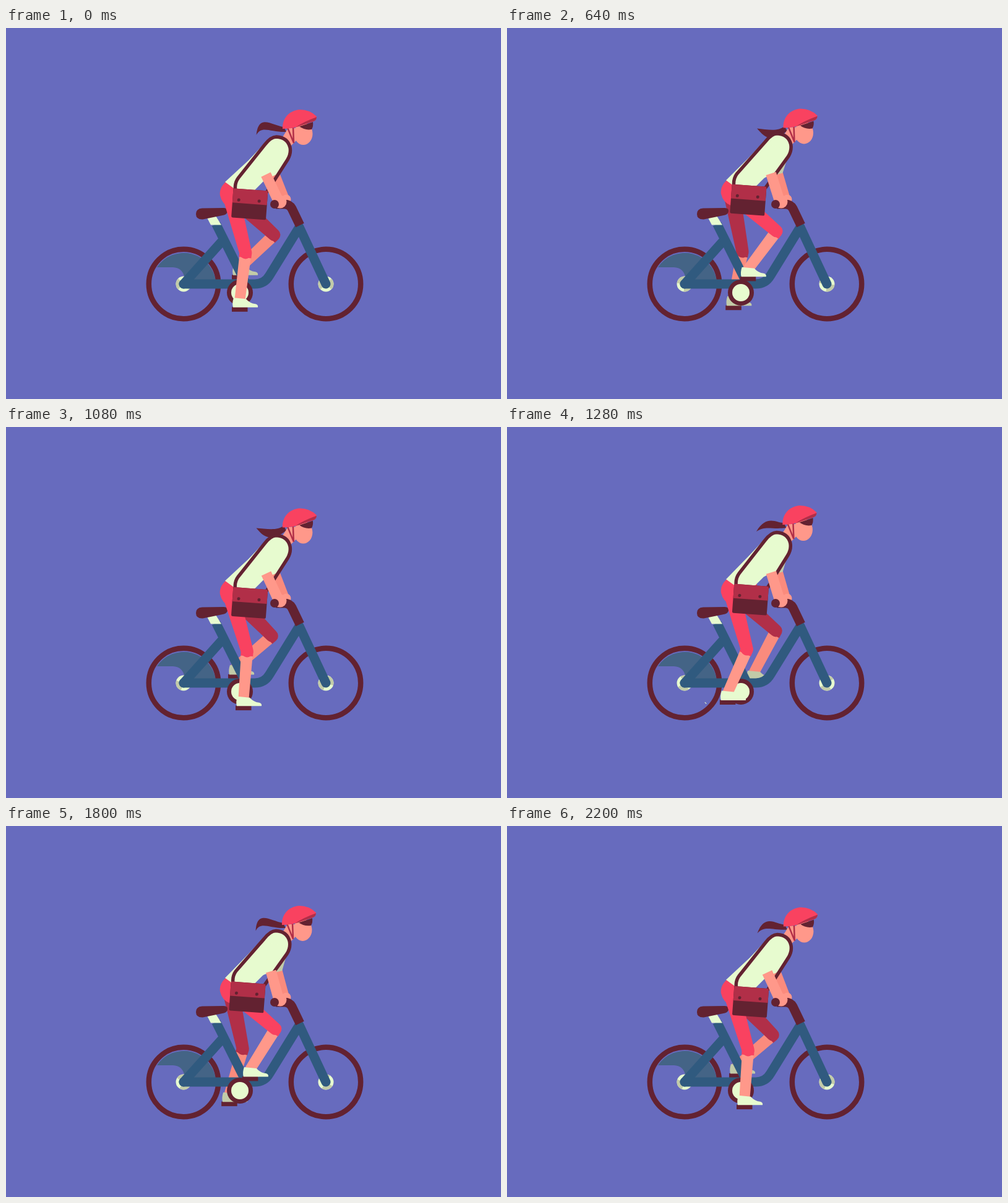
An HTML page for the animation above (2240 ms loop, 800 by 600 pixels).

```html
<!DOCTYPE html>
<html lang="en">
<head>
<meta charset="utf-8">
<title>Cyclist</title>
<style>
  html, body { margin: 0; width: 100%; height: 100%; overflow: hidden; background: #676bbe; }
  svg { display: block; width: 100vw; height: 100vh; }
  .dark { fill: #632231; }
  .light { fill: #e7fbcf; }
  .skin { fill: #ff988a; }
  .skin2 { fill: #fa8b7d; }
  .red { fill: #f94260; }
  .red2 { fill: #b12f48; }
  .shade { fill: #c2cba8; }
  .line { fill: none; stroke-width: 15; }
  .cuff { fill: none; stroke-width: 20; }
  .frame { stroke: #305a7f; }
  .tyre { fill: none; stroke: #632231; stroke-width: 8.5; }
  .glint { fill: none; stroke: #e7fbcf; stroke-width: 3.5; }
</style>
</head>
<body>
<svg viewBox="0 0 800 600">
  <defs>
    <rect id="pedal" class="dark" x="-13" y="-4" width="25.500" height="7.500"/>
    <path id="shoe" d="M-10-19L10-17Q16-10 25-9Q30-8 29-3.500H-11Q-13-10-10-19Z"/>
  </defs>

  <path id="farShin" class="skin2"/>
  <path id="farThigh" class="red2"/>
  <path id="farCuff" class="cuff" stroke="#b12f48"/>
  <g id="farFoot"><use href="#pedal"/><use href="#shoe" class="shade"/></g>

  <path fill="#446486" d="M244 387H270Q285 388 288 402L291 410H339A52 52 0 0 0 244 387Z"/>
  <g id="rear" transform="translate(287 414)"></g>
  <g id="front" transform="translate(517 414)"></g>

  <g class="line frame" stroke-linecap="round" stroke-linejoin="round">
    <path d="M287 414H402Q418 414 426 400L474 322L517 414"/>
    <path d="M287 414L348 346"/>
  </g>
  <path class="line frame" d="M339.500 317L386 410"/>
  <path class="light" d="M325 307L339 304L348 318.500H331Z"/>
  <path class="dark" d="M317 291.500L352 291Q359 291 358 297Q357 302 350 303L318 309.500Q307 310 307 301Q307 292 317 291.500Z"/>
  <circle cx="378" cy="428" r="17.500" class="light" stroke="#632231" stroke-width="7"/>

  <path id="farArm" class="line" stroke="#fa8b7d" stroke-linecap="round" style="stroke-width:13"/>
  <circle class="skin" cx="453" cy="277" r="7.500"/>
  <path class="line" stroke="#632231" d="M436 285H450Q458 285 462 292L475 319"/>

  <path id="pelvis" class="red" d="M355 249Q344 259 346 271Q349 285 362 290L392 301L404 257Z"/>
  <path id="nearShin" class="skin"/>
  <path id="nearThigh" class="red"/>
  <path id="nearCuff" class="cuff" stroke="#f94260"/>
  <g id="nearFoot"><use href="#pedal"/><use href="#shoe" class="light"/></g>

  <g id="head">
    <path id="tail" class="dark"/>
    <path class="skin" d="M446 178L456 162H472L470 181L459 192Z"/>
    <ellipse class="skin" cx="480.500" cy="171" rx="15" ry="18"/>
    <path class="dark" d="M472 160L496 152Q497 159 494 164Q483 166 474 159Z"/>
    <path fill="none" stroke="#b12f48" stroke-width="2.500" d="M455 161L465 186L464 160"/>
    <path class="red" d="M447 163C446 146 458 133 475 132Q491 132 502 143Q502 149 497 151L470 160Q460 163 447 163Z"/>
    <path class="red2" d="M468 160.500Q480 152 502 144Q502 149 497 151Z"/>
  </g>

  <path id="farSleeve" class="shade"/>
  <path id="torso" class="light"/>
  <path id="sleeve" class="light"/>
  <path id="strap" fill="none" stroke="#632231" stroke-width="5.500"/>
  <g id="bag">
    <rect class="dark" width="56" height="47" rx="2"/>
    <path class="red2" d="M2 0H54Q56 0 56 2V23H0V2Q0 0 2 0Z"/>
    <circle class="dark" cx="10" cy="18" r="2.500"/>
    <circle class="dark" cx="43" cy="17.500" r="2.500"/>
  </g>
  <path id="arm" class="line" stroke="#ff988a" style="stroke-width:17"/>
  <circle class="skin" cx="443" cy="281" r="10.500"/>
  <circle class="dark" cx="434" cy="285" r="7"/>
</svg>

<script>
const TAU = Math.PI * 2;
const LOOP = 2240, PEDAL = 1120, BOB = 560, SWISH = 448, STEP = 40;
const THIGH = 97, SHIN = 76.5;
const $ = id => document.getElementById(id);
const set = (id, d) => $(id).setAttribute('d', d);
const move = (id, x, y, turn = 0) =>
  $(id).setAttribute('transform', `translate(${x} ${y}) rotate(${turn})`);
const clamp = (v, lo, hi) => Math.min(hi, Math.max(lo, v));
const polar = (r, deg) => [r * Math.cos(deg * TAU / 360), r * Math.sin(deg * TAU / 360)];

for (const id of ['rear', 'front']) {
  $(id).innerHTML = `<circle r="56.2" class="tyre"/><path id="${id}Glint" class="glint"/>
    <circle r="12.5" class="light"/>
    <path id="${id}Hub" class="shade" d="M0 0L-8.8-8.8A12.5 12.5 0 0 0-8.8 8.8ZL8.8-8.8A12.5 12.5 0 0 1 8.8 8.8Z"/>`;
}

// Outline around two circles, used for tapered limbs.
function limb([ax, ay], [bx, by], ra, rb) {
  const len = Math.hypot(bx - ax, by - ay);
  const nx = (ay - by) / len, ny = (bx - ax) / len;
  return `M${ax + nx * ra} ${ay + ny * ra}L${bx + nx * rb} ${by + ny * rb}
    A${rb} ${rb} 0 0 0 ${bx - nx * rb} ${by - ny * rb}
    L${ax - nx * ra} ${ay - ny * ra}A${ra} ${ra} 0 0 0 ${ax + nx * ra} ${ay + ny * ra}Z`;
}

// Two-bone leg with the knee bending forward.
function leg(side, hip, angle) {
  const px = 378 - 27 * Math.sin(angle), py = 429.3 + 26 * Math.cos(angle);
  const ankle = [px, py - 16];
  const dx = ankle[0] - hip[0], dy = ankle[1] - hip[1], d = Math.hypot(dx, dy);
  const along = (d * d + THIGH ** 2 - SHIN ** 2) / (2 * d);
  const out = Math.sqrt(Math.max(0, THIGH ** 2 - along ** 2));
  const knee = [hip[0] + (dx * along + dy * out) / d, hip[1] + (dy * along - dx * out) / d];
  const ux = (ankle[0] - knee[0]) / SHIN, uy = (ankle[1] - knee[1]) / SHIN;
  set(side + 'Shin', limb(knee, ankle, 9.5, 8.5));
  set(side + 'Thigh', limb([hip[0] + 2, hip[1]], knee, 13.5, 10));
  set(side + 'Cuff', `M${knee}l${ux * 8} ${uy * 8}`);
  move(side + 'Foot', px, py);
}

// A highlight that turns with the wheel and is trimmed to a window of angles.
function glint(id, tail, from, to) {
  const a = clamp(tail, from, to), b = clamp(tail + 69, from, to);
  set(id, b - a > 0.5 ? `M${polar(47, a)}A47 47 0 0 1 ${polar(47, b)}` : '');
}

function ponytail(phase) {
  const c = Math.cos(phase), s = Math.sin(phase);
  const wave = (mid, a, b) => mid + a * c + b * s;
  const top1 = [wave(436.3, -6.3, -6.3), wave(164, -6.5, -1)];
  const top2 = [wave(418.3, -10.3, -13), wave(153, -15.5, -2.6)];
  const tip = [404.6, wave(169, 4, -3)];
  const low1 = [wave(416.3, -3.3, -7), wave(168.5, -12, -3.8)];
  const low2 = [wave(427.8, 0, -2.4), wave(179, -10, 2)];
  set('tail', `M449 160C${top1} ${top2} ${tip}C${low1} ${low2} 453 168Z`);
}

function upperBody(tx, ty, bx, by) {
  const at = (x, y) => `${x + tx} ${y + ty}`;
  set('torso', `M354 ${249 + ty / 2}L${at(392, 214)}L${at(421, 183)}Q${at(430, 175)} ${at(438, 176)}
    Q${at(455, 178)} ${at(459, 194)}Q${at(460, 204)} ${at(453, 214)}L${at(438, 236)}
    L${at(416, 248)}L${at(402, 262)}L372 ${262 + ty / 2}Z`);
  set('strap', `M${bx + 3} ${by + 2}Q${bx + 2} ${by - 9} ${bx + 8} ${by - 17}
    L${at(418, 189)}Q${at(428, 176)} ${at(437, 176)}Q${at(455, 177)} ${at(459, 193)}
    Q${at(461, 203)} ${at(455, 213)}L${bx + 54} ${by + 6}`);

  // The elbows swing forward as the shoulders rise.
  const ex = 420 - 1.25 * ty, ey = 239 + 0.3 * ty;
  const hx = 441 - ex, hy = 281 - ey, len = Math.hypot(hx, hy);
  const nx = hy / len * 11, ny = -hx / len * 11;
  set('arm', `M${ex} ${ey - 2}L441 281`);
  set('sleeve', `M${at(425, 195)}L${at(457, 202)}L${ex + nx} ${ey + ny}L${ex - nx} ${ey - ny}Z`);
  const fx = 436 - 0.65 * ty, fy = 237 + 0.3 * ty;
  set('farArm', `M${fx} ${fy}L451 275`);
  set('farSleeve', `M${at(438, 200)}L${at(457, 205)}L${fx + 6} ${fy - 1}L${fx - 6} ${fy + 2}Z`);
}

function draw(time) {
  const t = Math.floor(time / STEP + 1e-6) * STEP % LOOP;
  const crank = t / PEDAL * TAU;
  const bob = Math.cos(t / BOB * TAU);
  const sway = Math.cos(crank);
  const tx = bob - 1, ty = 3.9 * bob + 2 * sway - 5.9;

  const hip = [361, 270 + 0.65 * ty];
  leg('near', hip, crank);
  leg('far', hip, crank + Math.PI);

  const turn = t % BOB * 360 / BOB;
  glint('rearGlint', turn - 127.7, 43, 168);
  glint('frontGlint', turn - 230.7, -25, 100);
  move('rearHub', 0, 0, turn);
  move('frontHub', 0, 0, turn);

  move('head', 1.3 * tx, 4 * tx);
  ponytail(t / SWISH * TAU);
  move('pelvis', 0, ty / 2);

  const bx = 365.6 + 2 * Math.cos((t - 50) / PEDAL * TAU);
  const by = 252.8 + 3.8 * bob + 2.8 * sway;
  move('bag', bx, by, 4.2);
  upperBody(tx, ty, bx, by);
}

const start = performance.now();
function tick() {
  draw(performance.now() - start);
  requestAnimationFrame(tick);
}
draw(0);
requestAnimationFrame(tick);
</script>
</body>
</html>
```
